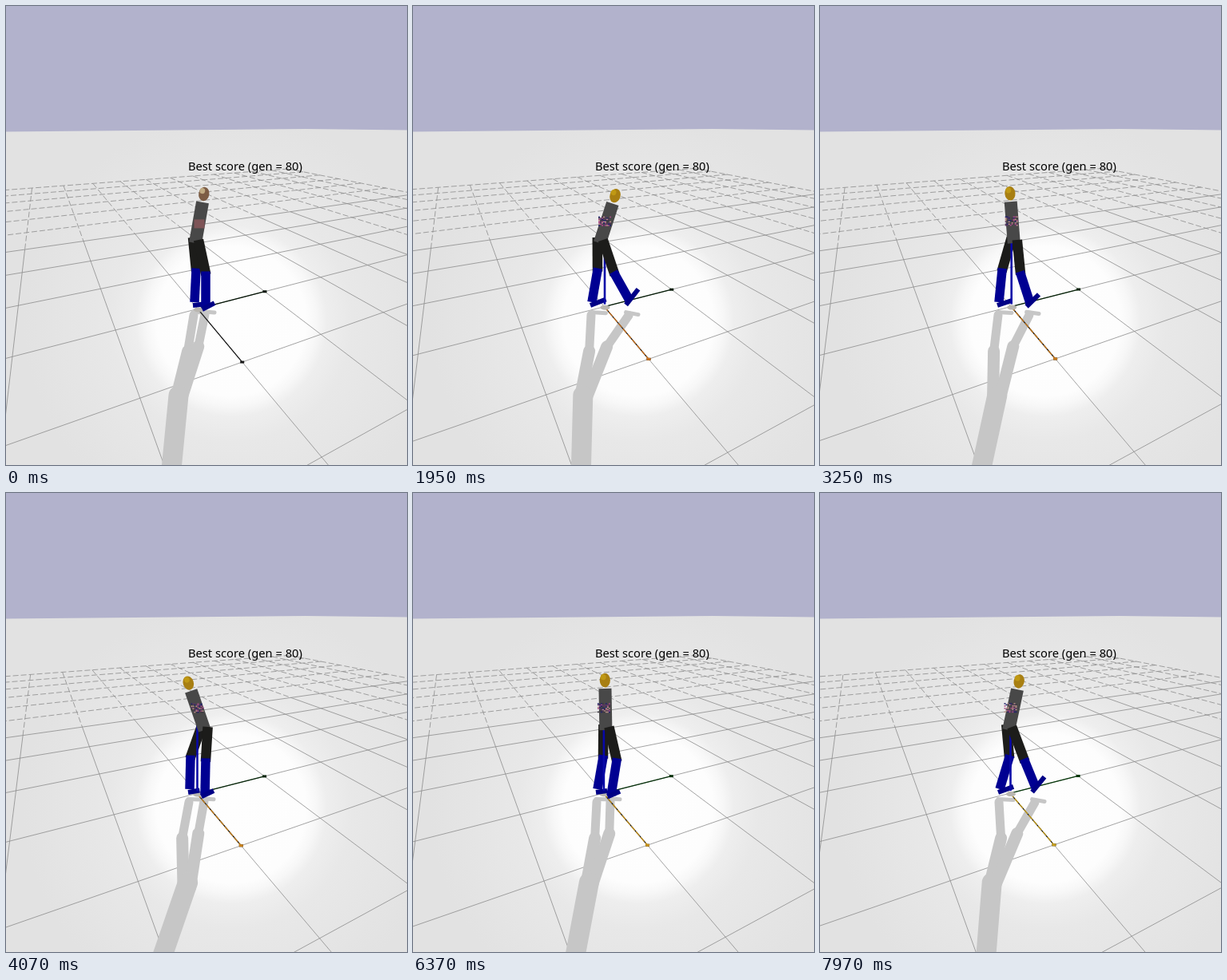
An HTML page with a canvas for the animation above (8 s loop, 502x575 px).

```html
<!DOCTYPE html>
<html>
<head>
<meta charset="utf-8">
<style>
  html, body { margin: 0; width: 100%; height: 100%; overflow: hidden; background: #e2e2e2; }
  canvas { display: block; }
</style>
</head>
<body>
<canvas id="stage" width="502" height="575"></canvas>
<script>
const ctx = document.getElementById('stage').getContext('2d');
const LOOP = 8000, LAST = 7970;

// Key poses: lean in degrees, then x of knee and ankle for each leg
const POSES = [
  { time: 0, lean: 10, back: [238, 236], front: [250, 250] },
  { time: 1130, lean: 25, back: [237, 231], front: [257, 264] },
  { time: 1950, lean: 18, back: [231, 224], front: [252, 271] },
  { time: 3250, lean: -4.5, back: [228, 224], front: [251, 263] },
  { time: 4070, lean: -19, back: [231, 230], front: [250, 249] },
  { time: 6370, lean: -1, back: [238, 231], front: [255, 248] },
  { time: LAST, lean: 12, back: [237, 225], front: [256, 270] }
];

const mix = (a, b, k) => a + (b - a) * k;
const add = (p, x, y) => [p[0] + x, p[1] + y];
const beyond = (p, q, k) => [p[0] + (p[0] - q[0]) * k, p[1] + (p[1] - q[1]) * k];

// Pictures hold for 100 ms, cut short just before each restart
function stepTime(t) {
  const base = [0, 830, 1150, 3270].filter(s => s <= t).pop();
  return base + Math.floor((t - base) / 100) * 100;
}

// Everything but the key values follows from the lean and the ankles
function poseAt(t) {
  const i = Math.max(1, POSES.findIndex(p => p.time >= t));
  const from = POSES[i - 1], to = POSES[i];
  const k = (1 - Math.cos(Math.PI * (t - from.time) / (to.time - from.time))) / 2;
  const lean = mix(from.lean, to.lean, k);
  const [back, front] = ['back', 'front'].map(s => from[s].map((x, j) => mix(x, to[s][j], k)));

  const angle = lean * Math.PI / 180;
  const hip = [241 - 0.4 * lean, 297];
  const neck = add(hip, 52 * Math.sin(angle), -52 * Math.cos(angle));
  const stride = front[1] - back[1], lift = front[1] - 246;

  const ankle1 = [back[1], 371];
  const ankle2 = [front[1], 379.5 - 0.43 * lift];
  const toe2 = add(ankle2, 11, -4 - 0.4 * lift);
  return {
    hip, neck, angle, head: beyond(neck, hip, 0.2),
    back: {
      top: add(hip, -3, -7), knee: [back[0], 331], ankle: ankle1,
      heel: add(ankle1, -2, 4), toe: [back[1] + 9 + stride * 0.18, 376 - stride * 0.18]
    },
    front: {
      top: add(hip, 4, -4), knee: [front[0], 335], ankle: ankle2,
      heel: beyond(ankle2, toe2, 0.4), toe: toe2
    }
  };
}

function line(color, width, ...points) {
  ctx.strokeStyle = color;
  ctx.lineWidth = width;
  ctx.beginPath();
  points.forEach(p => ctx.lineTo(...p));
  ctx.stroke();
}

function ellipse(color, [x, y], rx, ry, angle = 0) {
  ctx.fillStyle = color;
  ctx.beginPath();
  ctx.ellipse(x, y, rx, ry, angle, 0, Math.PI * 2);
  ctx.fill();
}

function drawBackdrop() {
  ctx.fillStyle = '#b2b2cc';
  ctx.fillRect(0, 0, 502, 575);
  const light = ctx.createRadialGradient(282, 395, 0, 282, 395, 260);
  [[0, '#fefefe'], [0.36, '#fdfdfd'], [0.41, '#f7f7f7'], [0.46, '#eeeeee'],
   [0.58, '#e8e8e8'], [1, '#e2e2e2']].forEach(s => light.addColorStop(...s));
  ctx.fillStyle = light;
  ctx.beginPath();
  [[0, 157.5], [375, 154], [502, 155.5], [502, 575], [0, 575]].forEach(p => ctx.lineTo(...p));
  ctx.fill();
}

// Perspective of the slowly drifting camera: floor cell (u, v) to pixel
function floorView(t) {
  const k = t / LAST;
  const a = mix(-0.22, -0.2173, k), b = mix(0.1016, 0.103, k);
  const origin = [240 - 2 * k, 376.8 + 2.6 * Math.exp(-t / 500) - 0.7 * k];
  const vanishU = [mix(42.5, 40, k), 143], vanishV = [1150, 144.5];
  const at = (u, v) => [0, 1].map(i =>
    (origin[i] + u * a * vanishU[i] + v * b * vanishV[i]) / (1 + u * a + v * b));
  return { at, origin, vanishU, vanishV };
}

function drawGrid({ at, vanishU, vanishV }) {
  const gray = '#8c8c8c';
  for (let v = -2; v <= 9; v++) {
    const far = at(-9, v), mid = at(-3, v);
    ctx.setLineDash([7, 3]);
    line(gray, 0.8, far, mid);
    ctx.setLineDash(v > 4 ? [7, 3] : []);
    line(gray, 0.8, mid, beyond(mid, vanishU, 12));
  }
  for (let u = -9; u <= 2; u++) {
    const far = at(u, 9);
    ctx.setLineDash(u < -3 ? [7, 3] : []);
    line(gray, 0.8, far, beyond(far, vanishV, 6));
  }
  ctx.setLineDash([]);
}

function drawShadow({ neck, hip, head, back, front }) {
  const gray = '#c6c6c6';
  const cast = ([x, y]) => {
    const h = 372 - y;
    return [x - h * (0.22 + 0.0008 * h), 382 + h * (1 + 0.0055 * h)];
  };
  const onFloor = ([x, y]) => [x, 384 + (372 - y) * 0.15];
  ctx.lineCap = 'round';
  for (const { top, knee, ankle, toe, heel } of [back, front]) {
    line(gray, 5, onFloor(heel), onFloor(toe));
    line(gray, 11, add(onFloor(ankle), -1, 3), cast(knee));
    line(gray, 15, cast(knee), cast(top));
  }
  line(gray, 25, cast(hip), cast(neck));
  ctx.lineCap = 'butt';
  ellipse(gray, cast(head), 11, 16);
}

function drawAxes({ at, origin }, t) {
  const axis = (color, end) => {
    line(color, 1.3, origin, end);
    ctx.fillStyle = color;
    ctx.fillRect(end[0] - 2.5, end[1] - 1.5, 5, 3);
  };
  const k = t / LAST;
  axis(`hsl(125, 80%, ${4 + 8 * k}%)`, at(0, 1));
  axis('#181818', at(1, 0));
  if (t >= 100) {
    ctx.setLineDash([7, 2]);
    axis(`hsl(${mix(24, 46, k)}, 75%, 45%)`, at(1, 0));
    ctx.setLineDash([]);
  }
  ellipse('#b9b6b0', add(origin, 1, 1), 6, 3);
}

function drawLeg({ top, knee, ankle, toe, heel }) {
  line('#1c1c1a', 12.5, top, beyond(knee, top, 0.04));
  line('#000092', 11.5, beyond(knee, ankle, 0.06), ankle);
  line('#000086', 6, heel, toe);
}

function drawWalker({ neck, hip, head, angle, back, front }, origin, t) {
  const lit = t >= 100;
  drawLeg(back);
  if (lit) line('#0808a8', 2.6, add(origin, 0.5, -92), add(origin, 0.5, -3));
  line('#484848', 16, neck, hip);
  drawLeg(front);
  ellipse(lit ? '#a87f12' : '#7c5c44', head, 6.6, 8.8, angle);
  ellipse(lit ? '#bf9814' : '#c0aa82', add(head, -2, -4), 3.4, 3.6, angle);
  drawLabel(add(origin, 0.5, -107), t);
}

// Flickering specks where the label of the upright axis meets the chest
function drawLabel([x, y], t) {
  if (t < 100) {
    ctx.fillStyle = 'rgba(150, 90, 95, 0.7)';
    ctx.fillRect(x - 5, y - 5, 13, 11);
    return;
  }
  const colors = ['#20206c', '#a84c88', '#b89088', '#3c3840', '#583860'];
  let seed = t + 7;
  for (let j = -6; j < 6; j += 1.5)
    for (let i = -8; i < 8; i += 2) {
      seed = (seed * 16807 + 11) % 2147483647;
      ctx.fillStyle = colors[seed % 5];
      if (seed % 7 < 5) ctx.fillRect(x + i, y + j, 2, 1.5);
    }
}

function draw(now) {
  const t = stepTime(now % LOOP);
  const pose = poseAt(t), view = floorView(t);
  drawBackdrop();
  drawGrid(view);
  drawShadow(pose);
  drawAxes(view, t);
  drawWalker(pose, view.origin, t);
  ctx.fillStyle = '#000';
  ctx.font = '14.7px "Noto Sans", "Open Sans", sans-serif';
  ctx.fillText('Best score (gen = 80)', 228, 206);
}

const start = performance.now();
function tick() {
  draw(performance.now() - start);
  requestAnimationFrame(tick);
}
tick();
</script>
</body>
</html>
```
